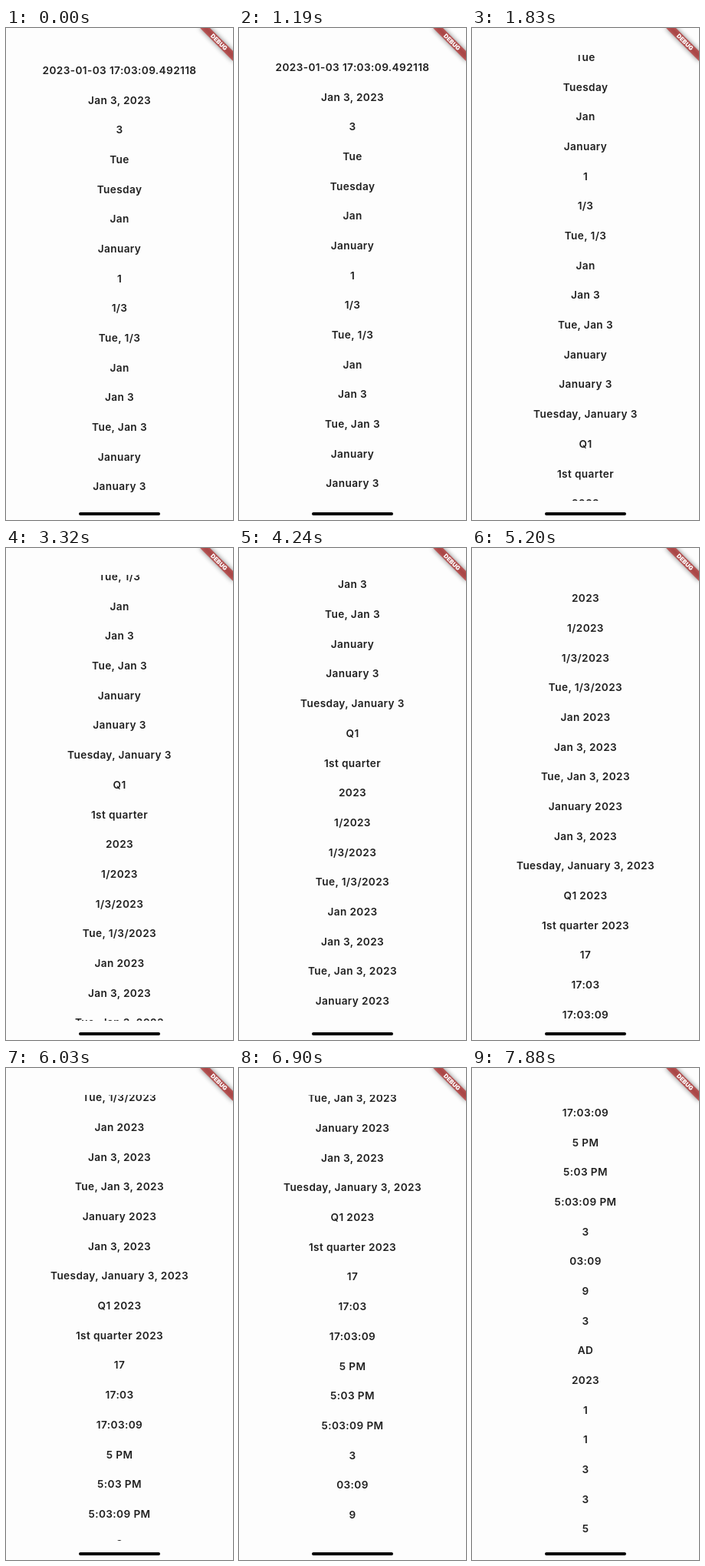
Write an HTML page that moves like this. It is 296 px wide and 640 px high and loops after 7990 ms.

```html
<!DOCTYPE html>
<html lang="en">
<head>
<meta charset="utf-8">
<title>Date formats</title>
<style>
  html, body { margin: 0; width: 100%; height: 100%; overflow: hidden; background: #fdfdfd; }
  #stage { position: relative; width: 296px; height: 640px; overflow: hidden; }
  #view { position: absolute; left: 0; top: 35px; width: 296px; height: 580px; overflow: hidden; }
  #list {
    padding-top: 0.85px;
    font: 600 13.6px/38.7px Inter, "Open Sans", sans-serif;
    letter-spacing: 0.4px;
    color: #1f1f1f;
    text-align: center;
    white-space: nowrap;
  }
  #list div { height: 38.7px; }
  #home {
    position: absolute; left: 95.3px; top: 630.1px;
    width: 105.4px; height: 3.8px; border-radius: 2px; background: #000;
  }
  #banner { position: absolute; left: 0; top: 0; }
  #banner text { font: 900 7.74px Inter, sans-serif; fill: #fff; text-anchor: middle; }
</style>
</head>
<body>
<div id="stage">
  <div id="view"><div id="list"></div></div>
  <div id="home"></div>
  <svg id="banner" width="296" height="80">
    <filter id="blur" x="-50%" y="-150%" width="200%" height="400%">
      <feGaussianBlur stdDeviation="3"/>
    </filter>
    <g transform="translate(296 0) rotate(45)">
      <rect x="-30.4" y="21.25" width="60.8" height="9.1" fill="#000" fill-opacity=".5" filter="url(#blur)"/>
      <rect x="-30.4" y="21.25" width="60.8" height="9.1" fill="#b71c1c" fill-opacity=".627"/>
      <text x="0" y="28.6">DEBUG</text>
    </g>
  </svg>
</div>
<script>
const LOOP = 7990;

const labels = `2023-01-03 17:03:09.492118|Jan 3, 2023|3|Tue|Tuesday|Jan|January|1|1/3|Tue, 1/3
|Jan|Jan 3|Tue, Jan 3|January|January 3|Tuesday, January 3|Q1|1st quarter
|2023|1/2023|1/3/2023|Tue, 1/3/2023|Jan 2023|Jan 3, 2023|Tue, Jan 3, 2023|January 2023
|Jan 3, 2023|Tuesday, January 3, 2023|Q1 2023|1st quarter 2023
|17|17:03|17:03:09|5 PM|5:03 PM|5:03:09 PM|3|03:09|9|3|AD|2023|1|1|3|3|5`.split("|");

// Each swipe: time of its first and last step, then the scroll offset at every step.
const swipes = [
  [1190, 1830, [4, 26, 58, 87, 109, 124, 132.9]],
  [2580, 2580, [136]],
  [2750, 3320, [146, 182, 234, 287, 331, 366]],
  [3430, 3970, [388, 401, 410, 416, 420, 422]],
  [4240, 4980, [433, 456, 500, 547, 587, 620, 645, 662]],
  [5090, 5530, [675.5, 686, 694.5, 701, 706]],
  [5710, 6460, [712, 740, 784, 829, 868, 898, 918, 931]],
  [6570, 6900, [936.5, 940, 942.5, 944.3]],
  [7120, 7880, [952, 985, 1037, 1092, 1141, 1182, 1213, 1235.4]]
];

const steps = swipes.flatMap(([start, end, offsets]) =>
  offsets.map((y, i) => ({
    time: Math.round(start + (end - start) * i / Math.max(1, offsets.length - 1)),
    y
  })));

const list = document.getElementById("list");
for (const label of labels) {
  const row = document.createElement("div");
  row.textContent = label.trim();
  list.append(row);
}

function offsetAt(time) {
  let y = 0;
  for (const step of steps) {
    if (step.time > time) break;
    y = step.y;
  }
  return y;
}

function draw() {
  const time = performance.now() % LOOP;
  list.style.transform = `translateY(${-offsetAt(time)}px)`;
  requestAnimationFrame(draw);
}
draw();
</script>
</body>
</html>
```
